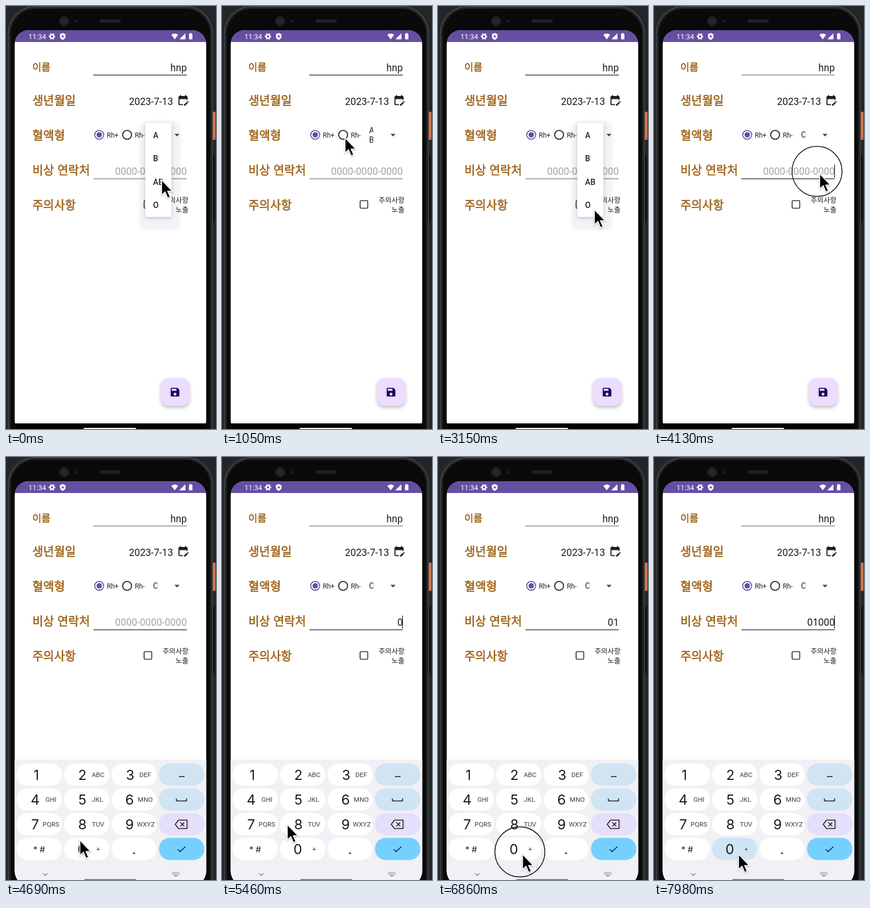
These frames come from a looping animation (374x752 px, 8 s). An HTML page:

```html
<!DOCTYPE html>
<html lang="ko">
<head>
<meta charset="utf-8">
<style>
html, body { margin: 0; height: 100%; overflow: hidden; background: #242528; }
svg { display: block; width: 100vw; height: 100vh; font-family: Roboto, "Noto Sans CJK KR", sans-serif; fill: #1c1b1f; }
.label { font: 21px "Noto Sans CJK KR", "Noto Sans CJK", sans-serif; fill: #9c6014; stroke: #9c6014; stroke-width: .55; }
.value { font-size: 17.5px; text-anchor: end; }
.small { font-size: 12px; }
.note { font: 12.5px "Noto Sans CJK KR", "Noto Sans CJK", sans-serif; text-anchor: end; }
.item { font-size: 14px; font-weight: 500; letter-spacing: .2px; }
.spin { font-weight: 400; }
.line { stroke: #48444c; }
.digit { font-family: Inter, Roboto, sans-serif; text-anchor: middle; }
.letters { font-size: 11.8px; fill: #3c3e44; text-anchor: middle; }
#menu { transform-origin: 271px 208px; }
#fab { filter: drop-shadow(0 3px 3px #0004); }
#card { filter: drop-shadow(0 2px 3px #0003); }
#mouse { filter: drop-shadow(0 1px 1px #0005); }
</style>
</head>
<body>
<svg viewBox="0 0 374 752">
  <defs>
    <clipPath id="screen"><rect x="15.5" y="43" width="341" height="719" rx="25"/></clipPath>
    <clipPath id="spinClip"><rect x="258" y="205" width="11.4" height="50"/></clipPath>
  </defs>

  <!-- phone body -->
  <rect width="374" height="752" fill="#242528"/>
  <rect x="368" y="188" width="5" height="50" rx="1" fill="#d9774f"/>
  <rect x="368" y="265" width="4" height="120" rx="1" fill="#111214"/>
  <rect x="4.5" y="1" width="363" height="800" rx="48" fill="#0a0a0b" stroke="#45484b" stroke-width="2"/>
  <rect x="7" y="3.5" width="358" height="800" rx="45" fill="none" stroke="#222426" stroke-width="3"/>
  <circle cx="103.5" cy="27" r="8" fill="#1b1d20" stroke="#303337"/>
  <circle cx="103.5" cy="27" r="4" fill="#34383e"/>
  <circle cx="103.5" cy="27" r="2" fill="#0c0d10"/>
  <circle cx="125" cy="27" r="3" fill="#17181a"/>
  <rect x="167" y="24.5" width="37" height="4.5" rx="2.2" fill="#1c1d1f" stroke="#2d2f31"/>

  <g clip-path="url(#screen)">
    <rect x="15" y="43" width="342" height="699" fill="#fff"/>
    <rect x="15" y="742" width="342" height="20" fill="#000"/>
    <rect x="138" y="750" width="94" height="4" rx="2" fill="#fff"/>

    <!-- status bar -->
    <rect x="15" y="43" width="342" height="21" fill="#654fa2"/>
    <g fill="#fff">
      <text x="40" y="58.7" font-size="12.6">11:34</text>
      <circle cx="82" cy="54" r="3.2" fill="none" stroke="#fff" stroke-width="2.4"/>
      <circle cx="82" cy="54" r="5" fill="none" stroke="#fff" stroke-width="1.8" stroke-dasharray="2.6 2.636" stroke-dashoffset="1.3"/>
      <path d="M101 48l5 2.2v3.5c0 3-2 5.4-5 6.5-3-1.1-5-3.5-5-6.5v-3.5z"/>
      <circle cx="101" cy="54" r="1.9" fill="#654fa2"/>
      <path d="M294.5 51.3q6-4.6 12 0l-6 8z"/>
      <path d="M319.5 48.5v10.800h-10.800z"/>
      <path d="M326 49.5h1.5v-1.3h3v1.3h1.5v9.8h-6z"/>
    </g>

    <!-- form -->
    <text class="label" x="47" y="115" style="font-size:17.5px">이름</text>
    <text class="label" x="47" y="175.2">생년월일</text>
    <text class="label" x="47" y="237.2">혈액형</text>
    <text class="label" x="47" y="299.2">비상 연락처</text>
    <text class="label" x="47" y="361">주의사항</text>

    <text class="value" x="322" y="116">hnp</text>
    <path id="nameLine" class="line" d="M155.5 122.7H322"/>
    <text class="value" x="297.5" y="176">2023-7-13</text>
    <path transform="translate(304.5 156.5) scale(.9)" d="M12 22H5c-1.1 0-2-.9-2-2V6c0-1.100.9-2 2-2h1V2h2v2h8V2h2v2h1c1.100 0 2 .9 2 2v6h-2v-2H5v10h7v2zM22.1 17l.7-.7c.4-.4.4-1 0-1.400l-.7-.7c-.4-.4-1-.4-1.400 0l-.7.7zM21.400 17.700L16.100 23H14v-2.100l5.300-5.300z"/>

    <g id="plus"></g><text class="small" x="179.5" y="233.5">Rh+</text>
    <g id="minus"></g><text class="small" x="229.5" y="233.5">Rh-</text>
    <g class="item spin" clip-path="url(#spinClip)">
      <g id="spinAB"><text x="262" y="226">A</text><text x="262" y="242.5">B</text></g>
      <text id="spinO" x="262" y="234.3">O</text>
    </g>
    <path d="M300 227.3h9l-4.500 4.700z" fill="#49454f"/>

    <text id="phone" class="value" x="322" y="300"></text>
    <path id="caret" d="M321.5 282v23" stroke="#1c1b1f" stroke-width="1.3"/>
    <path id="phoneLine" class="line" d="M155.5 307.2H322"/>

    <rect x="246" y="346" width="13.5" height="13.5" rx="1.5" fill="none" stroke="#38353b" stroke-width="1.7"/>
    <text class="note" x="325" y="349.5">주의사항</text>
    <text class="note" x="325" y="367.3">노출</text>

    <g id="fab"><rect x="276" y="661.5" width="50.5" height="49.5" rx="13.5" fill="#eaddff"/></g>
    <path fill="#21005d" transform="translate(290.7 676.2) scale(.86)" d="M17 3H5c-1.1 0-2 .9-2 2v14c0 1.100.9 2 2 2h14c1.100 0 2-.9 2-2V7l-4-4zm-5 16c-1.700 0-3-1.300-3-3s1.300-3 3-3 3 1.300 3 3-1.300 3-3 3zm3-10H5V5h10v4z"/>

    <g id="menu">
      <rect x="237" y="204" width="74" height="195" rx="16" fill="#6750a4" opacity=".07" style="filter:blur(2px)"/>
      <rect id="card" x="248" y="208" width="46.5" height="167" rx="2" fill="#fff"/>
      <g class="item">
        <text x="262" y="234.5">A</text><text x="262" y="276">B</text>
        <text x="262" y="317.5">AB</text><text x="262" y="359.2">O</text>
      </g>
    </g>

    <g id="keyboard">
      <rect x="15" y="538" width="342" height="230" fill="#f0f0f5"/>
      <g id="keys"></g>
      <g fill="none" stroke="#1c1b1f" stroke-width="1.6">
        <path d="M308 568.300h10M303.500 607v4.500h18v-4.500M306 697.500l4.200 4.200 9-9"/>
        <path d="M301.500 653l5.500-7.500h15.500v15H307zM310.500 649.500l7 7m0-7l-7 7"/>
      </g>
      <g fill="none" stroke="#77777d" stroke-width="1.3">
        <path d="M66 740l4 4 4-4"/>
        <path d="M296 738.500h13M296 741.500h13" stroke-dasharray="1.7 1.1"/>
        <path d="M299 744.500h7"/>
      </g>
      <rect x="139" y="750.5" width="93" height="4" rx="2" fill="#707076"/>
    </g>
  </g>

  <circle id="ring" r="44.5" fill="none" stroke="#111" stroke-width="1.4"/>
  <path id="mouse" d="M0 0V27.500L6.300 21.700 11 32.500 15.600 30.500 11 20.300H19.500Z" fill="#000" stroke="#fff" stroke-width="1.7"/>
</svg>

<script>
const LOOP = 8000, STEP = 70;
const $ = id => document.getElementById(id);
const set = (id, attrs) => { for (const k in attrs) $(id).setAttribute(k, attrs[k]); };
const show = (id, on) => $(id).style.display = on ? '' : 'none';
const clamp = v => Math.max(0, Math.min(1, v));
const ramp = (t, start, length) => clamp((t - start) / length);
const ease = p => p * p * (3 - 2 * p);

// time, x, y of the pointer tip
const route = [
  [0, 277, 309], [350, 277, 309], [840, 219, 234], [1260, 219, 234], [1610, 170, 234],
  [1890, 170, 234], [2030, 268.5, 233], [2240, 268.5, 233], [2800, 279, 370], [3080, 278.5, 362],
  [3430, 278, 358], [3850, 295, 298], [4130, 295, 298], [4690, 131.5, 681], [4900, 140, 709],
  [5250, 140, 709], [5740, 79.5, 567], [6370, 79.5, 567], [6790, 150.5, 706], [LOOP, 150.5, 706]
];
const clicks = [210, 1120, 1820, 1980, 3290, 4060, 4970, 6160, 6860, 7350, 7840];
const typed = [[5040, '0'], [6230, '1'], [6930, '0'], [7420, '0'], [7910, '0']];
const FOCUS = 4130, TO_MINUS = 1190, TO_PLUS = 1890;

// digit, letters, digit x, letters x
const keys = [
  ['1', '', 54], ['2', 'ABC', 136, 164], ['3', 'DEF', 221, 248], null,
  ['4', 'GHI', 52, 80], ['5', 'JKL', 136, 163], ['6', 'MNO', 220, 248], null,
  ['7', 'PQRS', 52, 80], ['8', 'TUV', 136, 164], ['9', 'WXYZ', 220, 249], null,
  ['* #', '', 59], ['0', '+', 135, 164], ['.', '', 228], null
];
const sideColors = ['#d0e4f3', '#d0e4f3', '#e6dffb', '#76d0ff'];
$('keys').innerHTML = keys.map((key, i) => {
  const row = i >> 2, y = 545 + row * 44;
  const [main, sub, x, subX] = key || ['', '', 0, 0];
  const size = main === '* #' ? 15 : 24.5;
  return `<rect id="key${main}" x="${19 + (i % 4) * 84.5}" y="${y}" width="80.5" height="39.5" rx="19"
    fill="${key ? '#fff' : sideColors[row]}"/>
    <text class="digit" x="${x}" y="${y + 20 + size * .37}" font-size="${size}">${main}</text>
    <text class="letters" x="${subX || 0}" y="${y + 24.2}">${sub}</text>`;
}).join('');

function pointer(t) {
  const i = route.findIndex(p => p[0] > t);
  const a = route[i - 1], b = route[i], p = ease(ramp(t, a[0], b[0] - a[0]));
  return [a[1] + (b[1] - a[1]) * p, a[2] + (b[2] - a[2]) * p];
}

function radio(id, x, on, p, ripple) {
  const width = on ? 1.7 : 1.8 + 6 * (1 - p);
  const color = on ? '#5d52a4' : '#1c1b1f';
  $(id).innerHTML = (ripple ? `<circle cx="${x}" cy="229" r="17" fill="#e4deeb"/>` : '') +
    `<circle cx="${x}" cy="229" r="${8.8 - width / 2}" fill="none" stroke="${color}" stroke-width="${width}"/>` +
    (on ? `<circle cx="${x}" cy="229" r="${4.8 * p}" fill="${color}"/>` : '');
}

function draw(t) {
  const [x, y] = pointer(t);
  $('mouse').setAttribute('transform', `translate(${x} ${y})`);
  set('ring', { cx: x - 4.7, cy: y - 4 });
  show('ring', clicks.some(c => t >= c && t < c + 140));

  const minusOn = t >= TO_MINUS && t < TO_PLUS;
  const changed = t >= TO_PLUS ? TO_PLUS : t >= TO_MINUS ? TO_MINUS : -LOOP;
  const p = ramp(t, changed, 210), ripple = t - changed < 280;
  radio('plus', 166, !minusOn, p, ripple && !minusOn);
  radio('minus', 215.7, minusOn, p, ripple && minusOn);

  const opening = t < 2100 ? 1 : ramp(t, 2100, 210);
  const shown = t < 2100 ? 1 - ramp(t, 350, 140) : opening * (1 - ramp(t, 3360, 140));
  show('menu', shown > 0);
  $('menu').style.opacity = shown;
  $('menu').style.transform = `scaleY(${.6 + .4 * ease(opening)})`;
  show('spinAB', t < 3360);
  show('spinO', t >= 3360);

  const focused = t >= FOCUS;
  const done = typed.filter(k => t >= k[0]);
  const last = done.length ? done[done.length - 1][0] : FOCUS;
  $('phone').textContent = done.map(k => k[1]).join('') || '0000-0000-0000';
  $('phone').style.fill = done.length ? '#1c1b1f' : '#a6a4a8';
  show('caret', focused && (t - last) % 1000 < 500);
  set('nameLine', { 'stroke-width': focused ? .9 : 1.6 });
  set('phoneLine', { 'stroke-width': focused ? 1.6 : .9 });

  const slide = 1 - Math.pow(1 - ramp(t, 4200, 280), 2);
  show('keyboard', slide > 0);
  $('keyboard').setAttribute('transform', `translate(0 ${214 * (1 - slide)})`);
  for (const digit of '01') {
    const pressed = typed.some(k => k[1] === digit && t >= k[0] && t < k[0] + 140);
    set('key' + digit, { fill: pressed ? '#d0e4f3' : '#fff' });
  }
}

function tick() {
  draw(Math.floor(performance.now() % LOOP / STEP) * STEP);
  requestAnimationFrame(tick);
}
tick();
</script>
</body>
</html>
```
